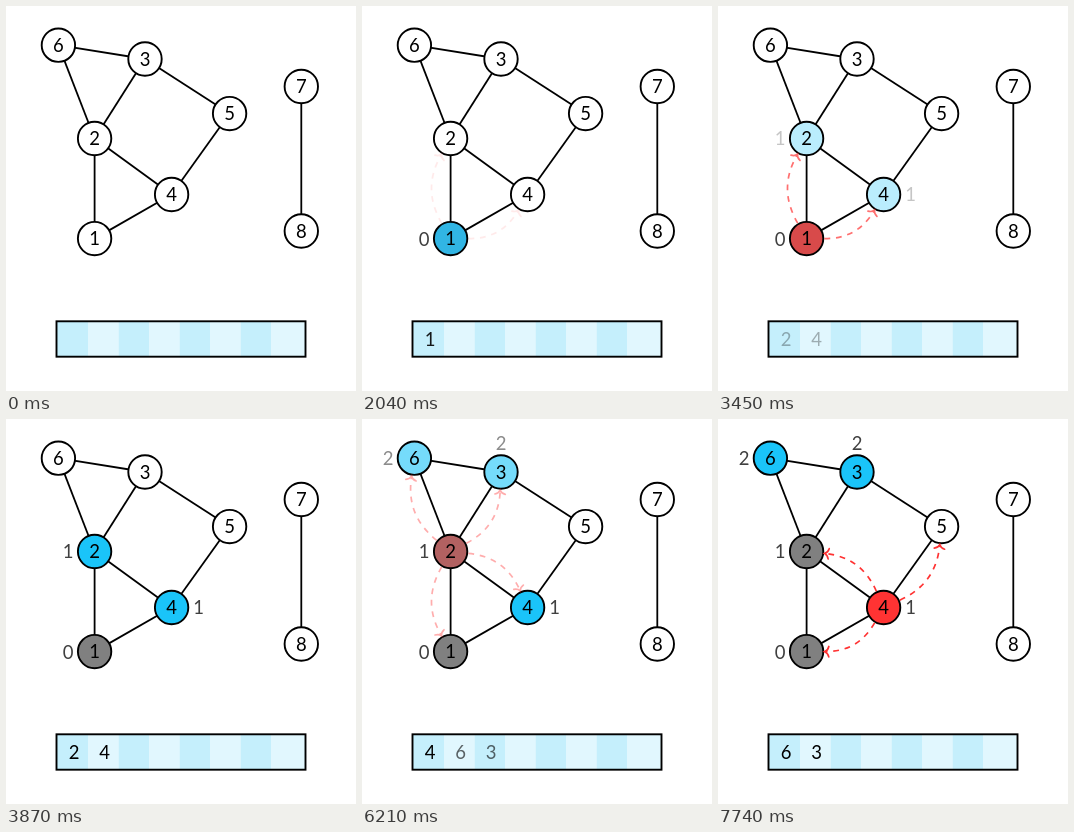
Write an HTML page that moves like this. It is 350 by 385 pixels and loops after 8000 ms.

```html
<!DOCTYPE html>
<html lang="en">
<head>
<meta charset="utf-8">
<title>Breadth-first search</title>
<style>
html, body { margin: 0; width: 100%; height: 100%; overflow: hidden; background: #fff; }
svg { display: block; width: 350px; height: 385px; }
text { font: 18.5px Lato, "DejaVu Sans", sans-serif; text-anchor: middle; }
.edge { stroke: #000; stroke-width: 1.8; }
.node { stroke: #000; stroke-width: 1.9; }
.level { fill: #404040; }
.arrow { fill: none; stroke: #f33; stroke-width: 1.7; }
.dash { stroke-dasharray: 5.8 5.8; }

/* each step fades in over the one before, in ten jumps of 60 ms */
.step { opacity: 0; animation: 8s infinite; }
#step0 { opacity: 1; }
#step1 { animation-name: fade1; }
#step2 { animation-name: fade2; }
#step3 { animation-name: fade3; }
#step4 { animation-name: fade4; }
#step5 { animation-name: fade5; }
#step6 { animation-name: fade6; }
@keyframes fade1 {
  0%, 9.375% { opacity: 0; animation-timing-function: steps(10, start); }
  16.875%, 100% { opacity: 1; }
}
@keyframes fade2 {
  0%, 25.5% { opacity: 0; animation-timing-function: steps(10, start); }
  33%, 100% { opacity: 1; }
}
@keyframes fade3 {
  0%, 41.625% { opacity: 0; animation-timing-function: steps(10, start); }
  49.125%, 100% { opacity: 1; }
}
@keyframes fade4 {
  0%, 57.75% { opacity: 0; animation-timing-function: steps(10, start); }
  65.25%, 100% { opacity: 1; }
}
@keyframes fade5 {
  0%, 73.875% { opacity: 0; animation-timing-function: steps(10, start); }
  81.375%, 100% { opacity: 1; }
}
@keyframes fade6 {
  0%, 90% { opacity: 0; animation-timing-function: steps(10, start); }
  97.5%, 100% { opacity: 1; }
}
</style>
</head>
<body>
<svg id="stage" viewBox="0 0 350 385"></svg>
<script>
const nodes = {
  1: [88.6, 232.6], 2: [88.6, 132.5], 3: [139, 53], 4: [165.6, 188.5],
  5: [223.6, 107.6], 6: [52.4, 39.2], 7: [295.3, 80.5], 8: [295.3, 225]
};
const edges = ['63', '62', '32', '35', '24', '21', '14', '54', '78'];
const levels = {
  1: ['0', 62, 233], 2: ['1', 62, 132.7], 4: ['1', 192.5, 188.7],
  6: ['2', 26.2, 39.2], 3: ['2', 139, 24.7]
};

// bends: L or R after the two node numbers
const steps = [
  { queue: '' },
  { queue: '1', blue: '1' },
  { queue: '', red: '1', arrows: ['12L', '14R'] },
  { queue: '24', blue: '24', grey: '1' },
  { queue: '4', blue: '4', red: '2', grey: '1', arrows: ['26L', '23R', '24L', '21R'] },
  { queue: '463', blue: '463', grey: '12' },
  { queue: '63', blue: '63', red: '4', grey: '12', arrows: ['42R', '41L', '45R'] }
];

const label = (s, x, y, cls = '') => `<text class="${cls}" x="${x}" y="${y + 6.6}">${s}</text>`;

function edge([a, b]) {
  const [x1, y1] = nodes[a], [x2, y2] = nodes[b];
  return `<line class="edge" x1="${x1}" y1="${y1}" x2="${x2}" y2="${y2}"/>`;
}

// cubic that leaves and enters the node borders 30 degrees off the straight line
function arrow([a, b, side]) {
  const [ax, ay] = nodes[a], [bx, by] = nodes[b];
  const dir = Math.atan2(by - ay, bx - ax);
  const bend = (side === 'L' ? -1 : 1) * Math.PI / 6;
  const out = dir + bend, back = dir + Math.PI - bend;
  const at = (x, y, angle, r) => [x + r * Math.cos(angle), y + r * Math.sin(angle)];
  const p = at(ax, ay, out, 17.8), q = at(bx, by, back, 18.2);
  const pull = 0.3915 * Math.hypot(q[0] - p[0], q[1] - p[1]);
  const c = at(...p, out, pull), d = at(...q, back, pull);
  const turn = (back + Math.PI) * 180 / Math.PI;
  return `<path class="arrow dash" d="M${p} C${c} ${d} ${q}"/>
    <path class="arrow" transform="translate(${q}) rotate(${turn})" stroke-linecap="round"
      d="M-4,-5.2 C-3.4,-2.6 -1,-.4 0,0 C-1,.4 -3.4,2.6 -4,5.2"/>`;
}

function fillOf(step, id) {
  const has = key => (step[key] || '').includes(id);
  return has('red') ? '#f33' : has('grey') ? '#808080' : has('blue') ? '#1ac4f9' : '#fff';
}

function node(step, id) {
  const [x, y] = nodes[id], fill = fillOf(step, id);
  const level = fill === '#fff' ? '' : label(...levels[id], 'level');
  return `<circle class="node" cx="${x}" cy="${y}" r="16.7" fill="${fill}"/>` + label(id, x, y) + level;
}

function queue(items) {
  let out = '';
  for (let i = 0; i < 8; i++) {
    const x = i ? 51.5 + 30.5 * i : 50.5, end = i < 7 ? 82 + 30.5 * i : 299.5;
    out += `<rect x="${x}" y="315.5" width="${end - x}" height="35" fill="${i % 2 ? '#e1f7fe' : '#c5effc'}"/>`;
  }
  out += '<rect x="50.5" y="315.3" width="249" height="35.4" fill="none" stroke="#000" stroke-width="1.9"/>';
  return out + [...items].map((s, i) => label(s, 68 + 30.5 * i, 333.2)).join('');
}

document.getElementById('stage').innerHTML = steps.map((step, i) =>
  `<g class="step" id="step${i}"><rect width="350" height="385" fill="#fff"/>` +
  edges.map(edge).join('') +
  Object.keys(nodes).map(id => node(step, id)).join('') +
  (step.arrows || []).map(arrow).join('') +
  queue(step.queue) + '</g>').join('');
</script>
</body>
</html>
```
